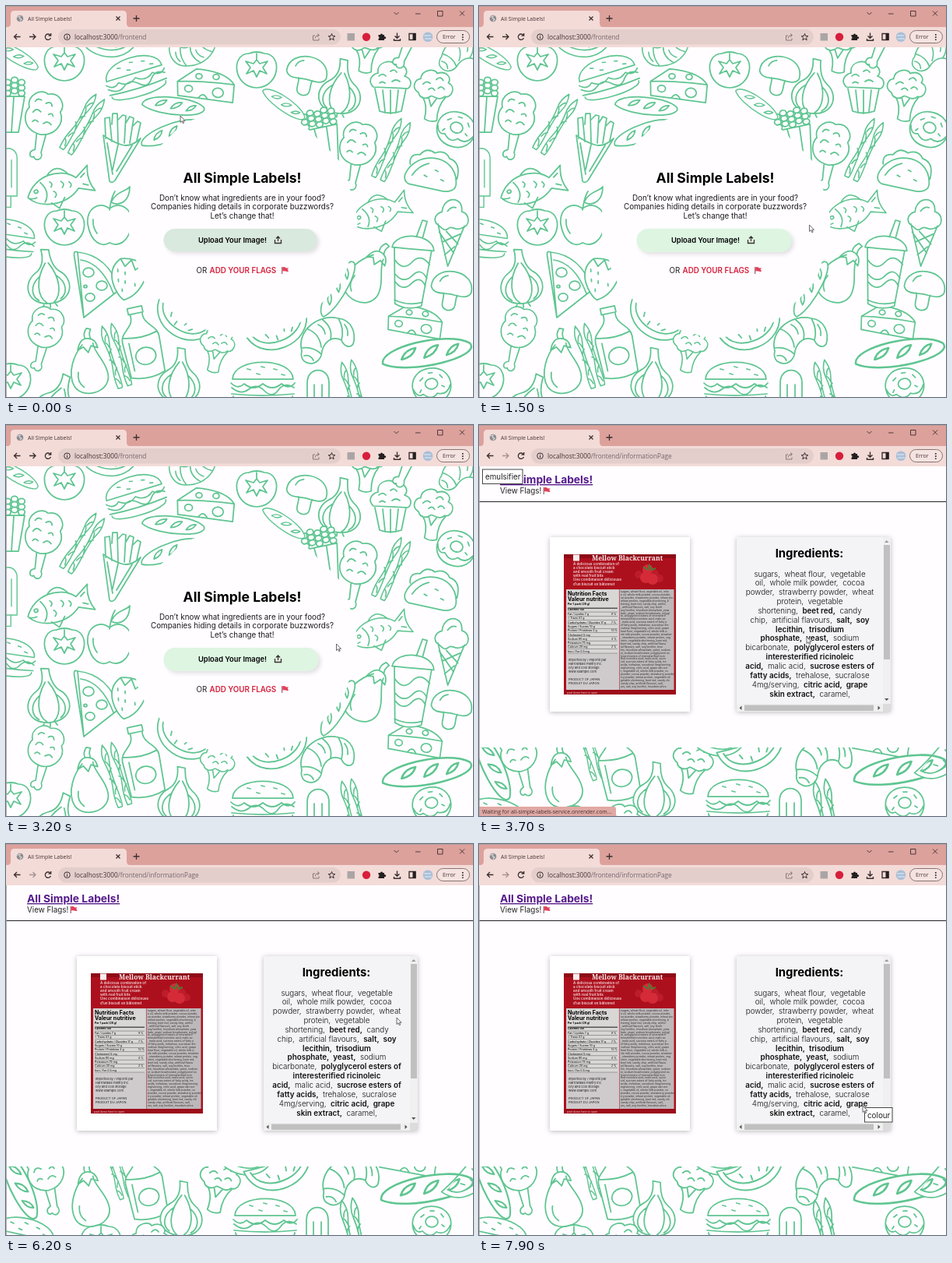
Animation, 600 px wide and 502 px high, one loop 8 s. Source, as an HTML page:

```html
<!DOCTYPE html>
<html lang="en">
<head>
<meta charset="utf-8">
<style>
html, body { margin: 0; width: 100%; height: 100%; overflow: hidden; background: #fffdff }
svg { display: block; width: 600px; height: 502px; font-family: Inter, sans-serif }
.food { fill: #fffdff; stroke: #5fc591; stroke-width: 1.75; stroke-linecap: round; stroke-linejoin: round }
.ui { font-family: "Open Sans", sans-serif; fill: #433 }
.ln { fill: none; stroke: #3a2f2f; stroke-width: 1.3 }
.thin { stroke-width: .9 }
.mid { text-anchor: middle }
.b { font-weight: 700 }
.card { filter: drop-shadow(0 1px 3px #0004) }
</style>
</head>
<body>
<svg viewBox="0 0 600 502">
  <defs>
    <clipPath id="strip"><rect y="414" width="600" height="88"/></clipPath>
    <g id="flag"><path d="M.7 0V9" stroke="#9b5a66" stroke-width="1.2"/><path d="M1.3.3Q4-.5 5 .8T9 .9L7.8 3.2 9 5.7Q7 6.4 5 5.6T1.3 5.6Z" fill="#e2405a"/></g>
  </defs>
  <rect width="600" height="502" fill="#fffdff"/>

  <g id="home">
    <g id="foods" class="food"></g>
    <path id="blob" fill="#fffdff"/>
    <g class="mid">
      <text x="303.5" y="226.5" font-size="17.6" class="b">All Simple Labels!</text>
      <g font-size="9.83" fill="#1b1b1b">
        <text x="303.5" y="249.5">Don’t know what ingredients are in your food?</text>
        <text x="303.5" y="261.3">Companies hiding details in corporate buzzwords?</text>
        <text x="303.5" y="273.2">Let’s change that!</text>
      </g>
    </g>
    <rect id="button" x="202.5" y="286" width="197" height="29" rx="14.5" style="filter:drop-shadow(3px 3px 2.5px #0000001c)"/>
    <text x="247" y="304" font-size="9.3" font-weight="600">Upload Your Image!</text>
    <path class="ln" stroke="#111" d="M345.500 300V304.500H353.500V300M349.500 302V296M347 298.500L349.500 296 352 298.500"/>
    <text x="244.500" y="343.300" font-size="9.800" fill="#222">OR <tspan x="261.500" font-weight="600" fill="#d5213d">ADD YOUR FLAGS</tspan></text>
    <use href="#flag" x="354" y="335"/>
  </g>

  <g id="info">
    <g clip-path="url(#strip)"><g id="stripFoods" class="food"></g></g>
    <text x="27" y="75" font-size="13.8" class="b" fill="#551a8b" text-decoration="underline">All Simple Labels!</text>
    <text x="27" y="88" font-size="9.83" fill="#222">View Flags!</text>
    <use href="#flag" x="82.500" y="80"/>
    <path d="M0 98.500H600" stroke="#222"/>
    <rect class="card" x="91" y="144" width="180" height="224" fill="#fff"/>
    <g id="photo"></g>
    <rect class="card" x="331" y="144" width="198" height="224" fill="#f4f3f5"/>
    <path d="M519 144H529V368H331V358H519Z" fill="#f1f0f1"/>
    <path d="M520 154H528V301H520ZM341 359.500H507V367H341Z" fill="#c1c0c1"/>
    <path d="M521 151H526.500L523.700 148Z" fill="#999"/>
    <path d="M521 351H526.500L523.700 354ZM337.500 360.500V366L334.500 363.200ZM512.500 360.500V366L515.500 363.200Z" fill="#555"/>
    <path d="M519 358H529V368H519Z" fill="#dcdcdc"/>
    <text x="424.500" y="170" font-size="14.9" class="b mid">Ingredients:</text>
    <g id="list" class="mid" font-size="9.83" font-weight="300" fill="#111"></g>
    <g id="status">
      <path d="M0 490H173Q176 490 176 493V502H0Z" fill="#e0a8a3"/>
      <text x="4" y="498.500" font-size="6.9" class="ui">Waiting for all-simple-labels-service.onrender.com...</text>
    </g>
  </g>

  <g id="browser">
    <rect width="600" height="28" fill="#dda19c"/>
    <path d="M0 53V27H2Q6 27 6 22V11Q6 6 11 6H150Q155 6 155 11V22Q155 27 159 27H600V53Z" fill="#f3dbd8"/>
    <circle cx="18" cy="16" r="4.300" fill="#8b8b8f"/>
    <path d="M14.500 14.500L18 13 17.500 16 20 17 18 19.500" class="ln" style="stroke:#d6d2d2"/>
    <text x="28" y="18.500" font-size="7" class="ui">All Simple Labels!</text>
    <path class="ln" d="M141.500 13.500L146.500 18.500M146.500 13.500L141.500 18.500M163.500 16H171.500M167.500 12V20"/>
    <path class="ln thin" d="M498.500 8L501.500 11 504.500 8M526 10H532.500M554.500 6.500H561V13H554.500ZM583 6.500L589 12.500M589 6.500L583 12.500"/>
    <rect x="67" y="30" width="363" height="19.500" rx="9.700" fill="#e4cecc"/>
    <path class="ln" d="M18.500 39.500H10.500M14 36L10.500 39.500 14 43M57 37.500A3.700 3.700 0 1 0 57.500 41M57.700 35V38.200H54.500"/>
    <path id="forward" class="ln" d="M30 39.500H38M34.500 36L38 39.500 34.500 43"/>
    <g class="ln" style="stroke-width:1">
      <circle cx="78.500" cy="39.700" r="3.800"/><path d="M78.500 39V42M78.500 37.300V38.200"/>
      <path d="M397 38H394.500V44H402V41.500M397 41.500Q397.500 37.500 402 37.500M400 35.500L402.500 37.500 400 39.700" stroke="#877"/>
      <path d="M418.500 35.500L419.700 38.500 422.800 38.700 420.400 40.700 421.200 43.800 418.500 42 415.800 43.800 416.600 40.700 414.200 38.700 417.300 38.500Z"/>
    </g>
    <text x="88" y="42.700" font-size="8.25" class="ui">localhost:3000<tspan id="path" fill="#75666a"></tspan></text>
    <rect x="438.500" y="35" width="9.500" height="9.500" fill="#aaa5a5"/>
    <circle cx="463" cy="39.700" r="5.200" fill="#d81e3c"/>
    <path d="M478.500 37H481A1.500 1.500 0 1 1 484 37H486V39.300A1.500 1.500 0 1 1 486 42V44H478.500V42A1.400 1.400 0 0 0 478.500 39.300Z" fill="#252020"/>
    <path class="ln" style="stroke-width:1.400" d="M502.500 34.500V41M499.500 38.500L502.500 41.300 505.500 38.500M498.500 42V44.200H506.500V42M518 35.500H526V43.500H518Z"/>
    <path d="M522.500 35H526.500V44H522.500Z" fill="#252020"/>
    <circle cx="542" cy="39.700" r="6.300" fill="#a9bfd8"/><path d="M537 38H546M538 42H547" stroke="#e8eef5"/>
    <rect x="553.500" y="31.500" width="42" height="16" rx="8" fill="#f5e3e1" stroke="#6b5a5a" stroke-width=".8"/>
    <text x="561" y="42.300" font-size="7" class="ui">Error</text>
    <path d="M586.800 36V44" stroke="#333" stroke-width="1.700" stroke-dasharray="1.700 1.500"/>
    <path d="M.5 53V502M0 .4H600" stroke="#a39a9a" stroke-width=".8"/>
  </g>

  <g id="tip">
    <rect id="tipBox" height="18.500" fill="#fff" stroke="#333" stroke-width=".9"/>
    <text id="tipText" font-size="9.83" fill="#222"></text>
  </g>
  <path id="arrow" d="M0 0V8.500L2 6.700 3.300 9.700 4.700 9.100 3.400 6.300H6Z" fill="#fff" stroke="#444" stroke-width=".8"/>
  <path id="beam" d="M-2-4.500Q0-4.500 0-3.500Q0-4.500 2-4.500M0-3.500V3.500M-2 4.500Q0 4.500 0 3.500Q0 4.500 2 4.500" fill="none" stroke="#222" stroke-width=".9"/>
</svg>
<script>
const $ = id => document.getElementById(id);

// Doodles, each drawn around its own centre
const ring = (x, y, r) => `M${x - r} ${y}a${r} ${r * .85} 0 1 0 ${2 * r} 0a${r} ${r * .85} 0 1 0 ${-2 * r} 0`;
const kernels = [-18, -9, 0, 9, 18].map((x, i) => [0, 1, 2].map(row => ring(x, -10 - row * 7 - i % 2 * 3, 4.3)).join('')).join('');
const spear = x => `M${x - 3} 45Q${x - 5} 30 ${x - 2} 15T${x - 3}-22Q${x - 6}-34 ${x + 1}-47Q${x + 7}-34 ${x + 4}-22T${x + 3} 15T${x + 3} 45Z` +
  [-34, -24, -12, 2, 16, 30].map((y, i) => i % 2 ? `M${x - 3} ${y}q4 2 5 9` : `M${x + 4} ${y}q-4 2-5 9`).join('');
const art = {
  tomato: 'M-10-21C-34-20-30 22 0 23C30 22 34-20 10-21Q0-25-10-21M0-21V-13M0-13L-4-8-14-11-8-3-13 5-4 1 0 9 4 1 13 5 8-3 14-11 4-8Z',
  burger: 'M-39-5C-38-34 38-34 39-5ZM-41 0Q-32 9-24 1Q-12 11 0 1Q12 11 24 1Q34 9 41 0M-40 6Q-28 16-18 8T2 10T20 9T40 6M-40 14Q0 18 40 14M-38 17C-40 30 40 30 38 17M-20-18l4 1M-2-21l4 1M14-18l4 1M-8-12l4 1M24-11l4 1',
  cheese: 'M-37-2L-14-20Q24-20 36-4V19L-35 16ZM-37-2Q0-6 36-4M-8 16q5-8 11 1' + ring(-22, 6, 5) + ring(16, 8, 7) + ring(-10, -11, 4) + ring(12, -12, 4),
  bread: 'M-41 3C-42-12 20-16 38-2C48 12-20 17-41 3ZM-24 2Q-20-6-10-6Q-14 2-24 2M-4 4Q0-5 10-5Q6 3-4 4M16 5Q20-3 28-3Q25 4 16 5',
  mushroom: 'M-26 0C-28-30 28-32 26 0C22 10 8 6 0 6C-10 6-22 10-26 0ZM-9 6C-6 14-13 26 0 27C13 26 6 14 9 6M-16-8Q-14-15-7-17',
  garlic: 'M-6-38Q-2-17-16-8C-34 4-30 32 0 32C30 32 34 4 16-8Q5-16 4-37ZM-2-20C-16 0-16 22-4 31M2-20C16 0 16 22 5 31M-10-4C-26 8-22 22-14 27M10-4C26 8 22 22 14 27M-8 33l-2 3M0 33v4M7 33l2 3',
  muffin: 'M-22 0C-32-10-20-18-16-18C-18-34 4-36 6-28C20-32 24-18 18-14C30-10 26 0 22 2ZM-20 2L-14 31Q0 36 14 31L20 2M-10 4L-7 32M0 4V34M10 4L7 32M-15-14q5-5 9 0M0-20q5-4 8 1M2-7q5-4 10 0M-14-5q3-3 7 0',
  broccoli: 'M-18 0C-30-6-24-18-18-18C-18-32 0-34 2-28C14-34 22-24 18-18C30-14 24 2 16 0C10 8 0 0-2 2C-8 8-16 6-18 0ZM-12 5Q-4 14-6 32Q2 36 10 32Q8 14 17 1M-14-12q4-6 9-2M2-20q5-6 9 0M6-9q4-5 8 0M-6-6q4-5 8 0M-4 5l4 10 6-11',
  donut: 'M0-23C33-23 33 22 0 22C-33 22-33-23 0-23ZM-24 1Q-20 13-12 9Q-2 19 6 10Q18 15 24 1M-14-9l4-3M12-13l3 4M-14 3l-2 3M13 1l3 2M-2-17h5' + ring(0, -3, 8),
  drumstick: 'M-4 14C-28 8-26-14-19-20C-24-36-4-46 4-38C20-42 28-24 21-16C28 0 14 16-4 14M-8 14L-9 34C-18 36-16 46-10 43C-8 50 3 46-1 37L4 14M-14-14q4-7 10-1M2-26q7-4 8 3M0 0q6-5 10 1M-12-28q3-5 8-2M6-12q5-3 6 2M-14-2q3-4 7 0',
  stalk: spear(-7) + spear(7),
  fries: 'M-22-12L-23-38-17-39-14-8M-14-30L-13-44-7-44-6-6M-6-36L0-42 4-41 2-6M4-32L9-40 14-38 9-6M13-28L19-34 23-32 18-9M-25-16L-17 43Q-14 46-10 42L23-12Q10 0-2-4T-25-16ZM-20-6L-13 34M-6-4L-13 28M12-3L-8 30',
  fish: 'M-42 4C-28-22 8-24 24-6L42-18Q36 0 44 16L24 8C4 26-30 22-42 4ZM-22-11Q-12 4-22 15M-12-17Q4-32 16-12M-8 4q5 4 0 8M4-6q5 4 0 8M14-3q4 4 0 7M-10-9q4 3 0 7M-14 18L-6 27 4 15M30-5l6-4M31 4l6 3M-40 6q6 2 9 1' + ring(-30, -1, 2.5),
  apple: 'M0-14C-14-24-30-14-28 6C-24 30-10 36 0 30C12 36 26 28 28 6C30-14 14-24 0-14ZM0-12Q2-28 7-36M2-22C8-36 22-36 26-42C26-24 14-16 2-22M-21 0Q-22 10-16 18',
  pizza: 'M-25-40Q14-36 29 8L-17 44ZM-25-40Q-31-43-29-33L-17 44M-21-30Q6-26 21 13' + ring(-11, -14, 7) + ring(6, 3, 7) + ring(-9, 18, 6) + ring(-15, 4, 2),
  berry: 'M-16-18C-34 4-8 30 2 32C18 22 28-6 14-18Q0-24-16-18ZM-16-18L-8-10-2-20 6-9 14-18M-16-4l1 3M-6-3l1 3M-12 8l1 3M-3 8l1 3M10 8l1 3M-4 19l1 3',
  eggplant: 'M-4-24C-16-14-30 8-23 27C-16 44 18 44 22 22C24 4 8-14 10-24M-11-18Q-6-32 3-31Q14-30 15-17L7-21 2-13-3-21ZM1-31Q-1-38 5-44L10-42Q6-36 8-30M-15 10Q-19 22-11 30',
  bottle: 'M-9-46H10V-38H-9ZM-7-38C-4-20-24-20-24-4L-22 42Q0 50 22 42L24-4C24-18 6-22 9-38M-22-10Q0-4 22-10M-16-2V34' + ring(2, 18, 13),
  melon: 'M-40-14Q0-8 40-14C38 30-36 34-40-14ZM-33-10C-28 20 28 18 33-11M-16-2l2 5M-4 4v5M8-3l-1 5M18 1l-3 4',
  croissant: 'M-33 14C-40-12-12-34 14-28C32-26 37-8 33 5C28 12 20 6 18 0C6-6-4 2-7 14C-8 28-20 34-30 27Q-35 22-33 14ZM-25-14Q-10-8-8 9M-6-26Q7-16 4-1M14-28Q22-14 18 0M-33 10Q-18 8-8 18M-30 20q8-2 12 6M-12-20q8 4 9 12M22-20q5 6 4 14',
  popsicle: 'M-14 40V-20C-14-42 14-42 14-20V40ZM-5-18V26M5-18V26M-4 40V58H4V40',
  taco: 'M-34 14C-30-20 22-30 32 6C36 18 24 22 14 22L-26 24Q-34 22-34 14ZM-31-1Q-36-14-22-16Q-16-28-4-23Q8-31 16-21Q32-20 32 2M-25 12Q-20-2-8-8M2-2l4 1M12 8l4 1M-10 8l4 1',
  cone: 'M-16-6L4 46 18-8M-18-6C-26-16-14-22-13-22C-14-44 12-46 12-26C24-24 24-10 18-7C8 2 2-8-2-2C-8 4-12-4-18-6ZM-13 4L9 28M-4 2L13 16M14 3L-7 16M9 20L-2 32M-6-24q4-7 10-6',
  smoothie: 'M-24-22L-17 50Q0 58 17 50L24-22ZM-27-22C-24-44 24-44 27-22ZM3-38L9-60 15-59 11-37M-22-6Q-10 8 0-5T23-4M-20 12Q-8 24 2 12T21 14M-19 22Q-8 34 2 22T20 24M-18 45Q0 52 18 45',
  popcorn: kernels + 'M-22-6L-14 40H14L22-6ZM-8-5L-5 40M8-5L5 40'
};
const draw = (id, list) => $(id).innerHTML = list.trim().split(/\s*;\s*/).map(item => {
  const [name, x, y, turn = 0, size = 1] = item.split(' ');
  return `<path d="${art[name]}" transform="translate(${x} ${y}) rotate(${turn}) scale(${size})"/>`;
}).join('');

draw('foods', `bread 14 64 30 .8; tomato 75 73; burger 166 91 -17 .95; croissant 240 50 170 .9; cheese 257 102 5;
  bread 216 128 6; tomato 322 82; mushroom 386 88 12; garlic 430 106 8; muffin 494 104; broccoli 548 114 8;
  broccoli 462 52 5; drumstick 522 36 15; melon 128 44 15; croissant 592 66 25 .9; donut 578 159 18; popcorn 2 122;
  drumstick 48 151 3; stalk 98 152 32 .9; fries 150 182; fish 68 232 -14; apple 133 274; tomato 75 284;
  popsicle 3 212 0 .8; burger 1 298 8 .9; garlic 54 350 -5; pizza 117 356; berry 158 346 15; drumstick 50 425 6 .95;
  stalk 141 450 -17 .9; eggplant 106 458 -10; bottle 174 432 -12; garlic 223 477 5; melon 225 404 35; broccoli 270 440 12 .9;
  melon 350 418 -20 1.05; croissant 413 429; mushroom 572 364 10; cheese 526 405 8 .95; bread 542 445 -10 1.45; burger 330 484;
  popsicle 401 504; stalk 447 497 -14 .9; donut 547 488 -8; tomato 6 482; garlic 66 510 20;
  drumstick 452 190 3; stalk 495 185 25 .9; popcorn 405 162 -12; taco 549 212 15; cone 570 288 8;
  smoothie 521 334 5; fish 480 264 -18 .92; eggplant 466 343 24; bread 426 362 -60; bread 212 162 -20; bread 358 126 35 .8`);
draw('stripFoods', `bread 18 438 65 1.2; drumstick 54 430 -20; stalk 143 420 -18 .8; eggplant 107 452 -12; bottle 178 436 -12;
  broccoli 273 438 14 1.05; garlic 226 471 5; melon 300 402 25; melon 352 420 -20 1.1; burger 333 482;
  croissant 443 432 0 1.05; cheese 517 404 8; bread 542 442 -10 1.5; popsicle 400 503; stalk 447 502 -12;
  donut 547 488; melon 596 425 -50; tomato 122 512; burger 22 507 12; broccoli 185 518`);

let edge = '';
for (let a = 0; a < 360; a += 2) {
  const r = 146 + 1.5 * Math.cos(a * Math.PI / 15), q = a * Math.PI / 180;
  edge += `${a ? 'L' : 'M'}${304 + r * Math.cos(q)} ${278.5 + r * Math.sin(q)}`;
}
$('blob').setAttribute('d', edge + 'Z');

// Asterisks mark flagged ingredients; each comma is followed by a double space
const lines = `sugars, wheat flour, vegetable
oil, whole milk powder, cocoa
powder, strawberry powder, wheat
protein, vegetable
shortening, *beet red,* candy
chip, artificial flavours, *salt, soy*
*lecithin, trisodium*
*phosphate, yeast,* sodium
bicarbonate, *polyglycerol esters of*
*interesterified ricinoleic*
*acid,* malic acid, *sucrose esters of*
*fatty acids,* trehalose, sucralose
4mg/serving, *citric acid, grape*
*skin extract,* caramel,`.split('\n');
$('list').innerHTML = lines.map((line, i) =>
  `<text x="425" y="${194.5 + i * 11.85}">${line.replace(/,(\*?) /g, ',$1\u00a0 ')
    .replace(/\*(.*?)\*/g, '<tspan font-weight="600">$1</tspan>')}</text>`).join('');

// Package picture
const box = (x, y, w, h, fill) => `<rect x="${x}" y="${y}" width="${w}" height="${h}" fill="${fill}"/>`;
const word = (x, y, size, text, more = '') => `<text x="${x}" y="${y}" font-size="${size}" ${more}>${text}</text>`;
const column = (x, y, size, step, rows, more) => rows.map((s, i) => word(x, y + i * step, size, s, more)).join('');
const prose = lines.join(' ').replace(/\*/g, '');
const small = Array.from({ length: 32 }, (_, i) => {
  const at = i * 29 % (prose.length - 42);
  return prose.slice(at, at + 39).trim();
});
$('photo').innerHTML = box(109, 166, 144, 180, '#ad101d') + box(109, 166, 144, 5, '#8e0b17') +
  box(112, 211, 68, 129, '#cfcbcc') + box(180.5, 211, 70, 129, '#bdb8ba') + box(113, 212, 66, 82, '#d9d6d6') +
  box(121, 166.5, 8, 8, '#f5eeee') +
  word(145, 174, 8.6, 'Mellow Blackcurrant', 'fill="#f7e5e5" font-weight="700" font-family="Noto Serif, serif"') +
  column(121, 180, 4.6, 5.1, ['A delicious combination of', 'a chocolate biscuit stick', 'and smooth fruit cream', 'with real fruit bits', 'Une combinaison délicieuse', 'd’un biscuit en bâtonnet'], 'fill="#f3d3d5" font-weight="600"') +
  [[205, 192], [217, 186], [226, 191], [214, 196], [232, 197], [223, 198]].map(([x, y], i) =>
    `<circle cx="${x}" cy="${y}" r="${5 + i % 2 * 2}" fill="${i % 2 ? '#d52b38' : '#bd1c2b'}"/>`).join('') +
  '<path d="M211 182L217 186 219 180 222 186 227 184" stroke="#4f7a36" stroke-width="2" fill="none"/>' +
  column(114, 218.5, 7, 7, ['Nutrition Facts', 'Valeur nutritive'], 'class="b"') +
  column(114, 231, 3.5, 7, ['Per 1 pack (28 g)', 'Calories 140'], 'font-weight="700"') +
  column(114, 244, 3.6, 5.3, ['Fat / Lipides 7 g', '  + Trans 0.1 g', 'Carbohydrate / Glucides 17 g', 'Sugars / Sucres 10 g', 'Protein / Protéines 2 g', 'Cholesterol 5 mg', 'Sodium 90 mg', 'Potassium 75 mg', 'Calcium 20 mg', 'Iron / Fer 0.5 mg']) +
  column(170, 244, 3.4, 10.6, ['9 %', '7 %', '10 %', '4 %', '2 %']) +
  Array.from({ length: 12 }, (_, i) => box(114, 234.5 + i * 5.3, 64, i ? .5 : 1.5, '#555')).join('') +
  column(115, 303, 4, 5, ['Imported by / Importé par', 'Harrowdale Pantry Inc.', 'Dry and cool storage', 'www.example.com', '', 'PRODUCT OF JAPAN', 'PRODUIT DU JAPON'], 'fill="#222"') +
  column(182, 215, 3.4, 3.93, small, 'fill="#333"') +
  box(109, 340, 144, 6, '#9d0d19') + word(113, 344.5, 3.5, 'peel down here to open', 'fill="#f3cfd0"');

// Pointer stops: time, x, y
const stops = [[0, 224, 141], [300, 224, 141], [1200, 424.5, 281], [3500, 424.5, 281], [3700, 421, 272], [4100, 421, 272],
  [4800, 428, 230], [5300, 428, 230], [6000, 502, 223], [6700, 502, 223], [7500, 493, 336], [8000, 493, 336]];
const pointer = t => {
  const i = stops.findIndex(s => s[0] > t), [t0, x0, y0] = stops[i - 1], [t1, x1, y1] = stops[i];
  const p = (t - t0) / (t1 - t0), e = p * p * (3 - 2 * p);
  return [x0 + (x1 - x0) * e, y0 + (y1 - y0) * e];
};
const show = (id, on) => $(id).style.display = on ? '' : 'none';
const set = (id, attrs) => { for (const k in attrs) $(id).setAttribute(k, attrs[k]); };
const tip = (x, y, w, text) => {
  set('tipBox', { x, y, width: w });
  set('tipText', { x: x + 3.5, y: y + 13 });
  $('tipText').textContent = text;
};

function frame(now) {
  const t = Math.floor(now % 8000 / 100) * 100;
  const home = t < 3500, [x, y] = pointer(t);
  show('home', home);
  show('info', !home);
  show('status', t < 4300);
  $('path').textContent = home ? '/frontend' : '/frontend/informationPage';
  set('forward', { style: home ? '' : 'stroke:#a59391' });
  const lit = t >= 700;
  set('button', { fill: lit ? '#def5e2' : '#d9e9de', width: lit ? 199 : 197, height: lit ? 30 : 29 });

  const early = !home && t < 4300, late = t >= 7500;
  show('tip', early || late);
  if (early) tip(4.5, 57, 51.5, 'emulsifier');
  if (late) tip(x + 2.5, y + 2.5, 35.5, 'colour');

  const beam = t >= 4400 && t < 5700;
  show('arrow', !beam);
  show('beam', beam);
  set(beam ? 'beam' : 'arrow', { transform: `translate(${x} ${y})` });
  requestAnimationFrame(frame);
}
requestAnimationFrame(frame);
</script>
</body>
</html>
```
